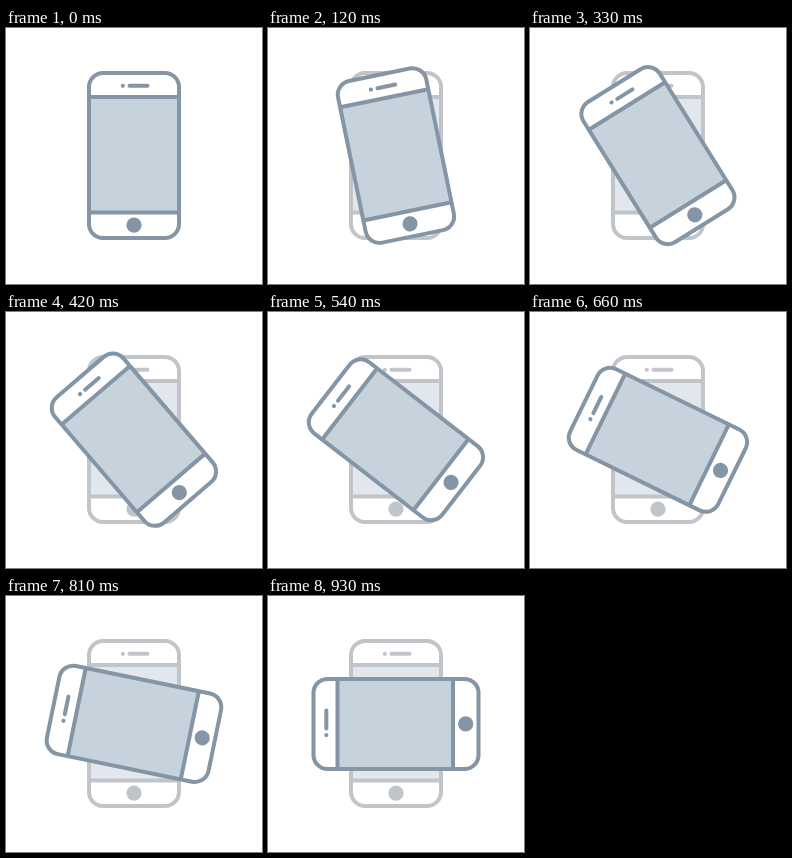
An HTML page that plays this animation: 256x256 px, repeating every 1.8 s.

```html
<!DOCTYPE html>
<html lang="en">
<head>
<meta charset="utf-8">
<title>Phone rotation</title>
<style>
  html, body { margin: 0; width: 100%; height: 100%; overflow: hidden; background: #fff; }
  svg { display: block; width: 100vw; height: 100vh; }
  .phone { --line: #8495a5; --screen: #c6d3dc; }
  .ghost { --line: #c1c5ca; --screen: #e2e7ee; }
  .body { fill: #fff; }
  .screen { fill: var(--screen); }
  .line { fill: none; stroke: var(--line); stroke-width: 4; }
  .round { stroke-linecap: round; }
  .dot { fill: var(--line); }
</style>
</head>
<body>
<svg viewBox="0 0 256 256">
  <defs>
    <g id="shape">
      <rect class="body" x="83" y="45" width="90" height="165" rx="14"/>
      <rect class="screen" x="83" y="69" width="90" height="115.5"/>
      <path class="line" d="M83 69H173M83 184.5H173"/>
      <rect class="line" x="83" y="45" width="90" height="165" rx="14"/>
      <circle class="dot" cx="116.8" cy="57.8" r="2.1"/>
      <path class="line round" d="M123.5 57.8H141.5"/>
      <circle class="dot" cx="128" cy="197.2" r="7.6"/>
    </g>
  </defs>
  <use class="ghost" href="#shape"/>
  <use class="phone" id="phone" href="#shape"/>
</svg>
<script>
  const LOOP = 1800, STEP = 30, TURN_STEPS = 31;
  const phone = document.getElementById('phone');
  const ghost = document.querySelector('.ghost');
  const start = performance.now();

  function draw(now) {
    const time = Math.max(0, now - start) % LOOP;
    const step = Math.min(Math.floor(time / STEP), TURN_STEPS);
    const angle = -90 * step / TURN_STEPS;
    phone.setAttribute('transform', `rotate(${angle} 128.2 127.7)`);
    ghost.setAttribute('visibility', step ? 'visible' : 'hidden');
    requestAnimationFrame(draw);
  }
  draw(start);
</script>
</body>
</html>
```
